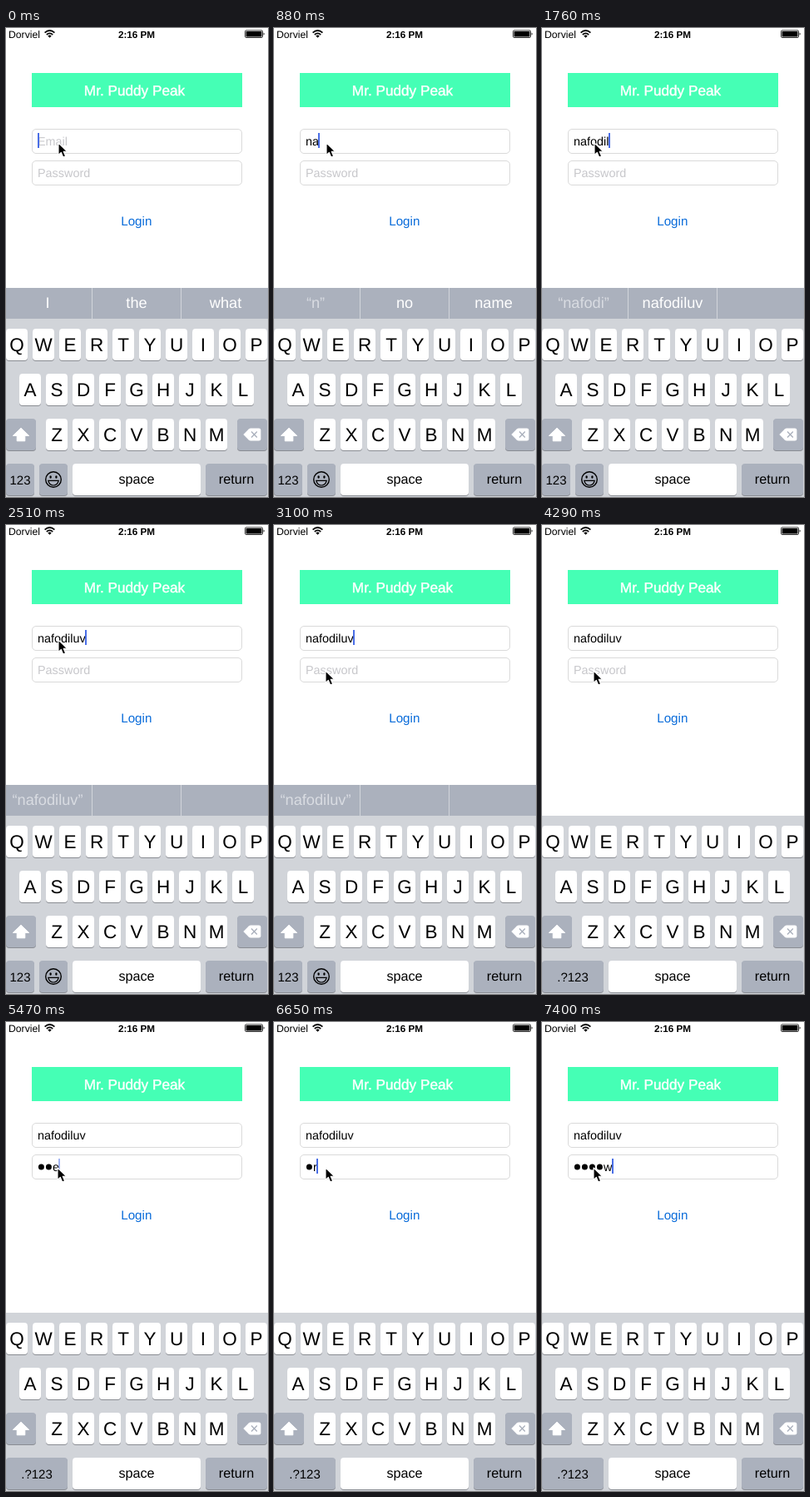
An HTML page that plays this animation: 315x563 px, repeating every 7990 ms.

```html
<!DOCTYPE html>
<html lang="en">
<head>
<meta charset="utf-8">
<title>Login form</title>
<style>
  html, body { margin: 0; width: 100%; height: 100%; overflow: hidden; background: #fff; }
  svg { display: block; width: 315px; height: 563px; }
  text {
    font-family: "Liberation Sans", Arial, sans-serif;
    text-rendering: geometricPrecision;
    white-space: pre;
  }
  .mid { text-anchor: middle; }
  .input { font-size: 14.4px; }
  .hint { fill: #c7c7cb; }
  .box { fill: #fff; stroke: #dadada; }
  .letter { font-size: 22.5px; }
  .word { font-size: 16.2px; }
  .num { font-size: 15px; }
  .slot { font-size: 18.2px; fill: #fff; }
</style>
</head>
<body>
<svg id="stage" viewBox="0 0 315 563">
  <defs>
    <clipPath id="barClip"><rect y="312" width="315" height="37"/></clipPath>
  </defs>
  <rect width="315" height="563" fill="#fff"/>

  <text x="3" y="11.6" font-size="12.2">Dorviel</text>
  <g fill="none" stroke="#000" stroke-width="1.7">
    <path d="M46.6 5.6Q52.5 .4 58.4 5.6"/>
    <path d="M48.8 8Q52.5 4.8 56.2 8"/>
  </g>
  <path d="M50.3 9.4Q52.5 7.6 54.7 9.4L52.5 11.8Z"/>
  <text class="mid" x="157" y="11.6" font-size="11.7" font-weight="bold">2:16 PM</text>
  <rect x="287.5" y="2.9" width="21" height="8.6" rx="1.3" fill="none" stroke="#000" stroke-width=".8"/>
  <rect x="288.6" y="4" width="18.8" height="6.4" rx=".5"/>
  <path d="M309.6 5.6Q311.6 7.2 309.6 8.8Z"/>

  <rect x="31" y="54" width="253" height="41" fill="#45ffb5"/>
  <text class="mid" x="154.5" y="81" font-size="17.2" fill="#fff" stroke="#fff" stroke-width=".4">Mr. Puddy Peak</text>

  <rect class="box" x="31.5" y="121.5" width="252" height="29" rx="4.5"/>
  <rect class="box" x="31.5" y="159.5" width="252" height="29" rx="4.5"/>
  <text id="emailHint" class="input hint" x="38" y="141">Email</text>
  <text id="passHint" class="input hint" x="38" y="179">Password</text>
  <text id="email" class="input" x="38" y="141"></text>
  <g id="dots"></g>
  <text id="last" class="input" y="179"></text>
  <rect id="caret" width="2" height="18" fill="#4a6ee6"/>
  <text class="mid" x="156.8" y="236.6" font-size="15.2" fill="#0a6cda">Login</text>

  <g clip-path="url(#barClip)">
    <g id="bar">
      <rect y="312" width="315" height="38" fill="#abb1bd"/>
      <path d="M103.5 312V350M210.5 312V350" stroke="#d1d5db"/>
      <g id="slots"></g>
    </g>
  </g>
  <rect y="349" width="315" height="214" fill="#d1d4d9"/>
  <g id="keys"></g>
  <path d="M18 480.2L27.6 489.4H22.8V495.8H13.2V489.4H8.4Z" fill="#fff" stroke="#fff" stroke-linejoin="round"/>
  <path d="M285.4 488L292 481.2Q293 480.4 294.2 480.4H304Q306.4 480.4 306.4 482.8V493.2Q306.4 495.6 304 495.6H294.2Q293 495.6 292 494.8Z" fill="#fff"/>
  <path d="M295 484.6L301.8 491.4M301.8 484.6L295 491.4" stroke="#abb1bd" stroke-width="1.4"/>
  <g id="plainKeys"></g>
  <g id="passKeys"></g>

  <path id="pointer" d="M0 0V14.4L3.3 11.4L5.7 17L8.6 15.8L6.2 10.3H10.6Z" fill="#000" stroke="#fff" stroke-width="1.1" stroke-linejoin="round"/>
</svg>

<script>
const LOOP = 7990;
const NAME = "nafodiluv";
const FOCUS_PASS = 3540;

// Each track: [start ms, value...]
const typed = [[0, 0], [580, 1], [880, 2], [1020, 3], [1170, 4], [1470, 5],
  [1620, 6], [1760, 7], [2060, 8], [2360, 9]];
const words = [[0, "I", "the", "what"], [730, "“n”", "no", "name"],
  [1470, "“nafo”", "nature", "national"], [1620, "“nafodi”", NAME, ""],
  [1910, "“nafodil”", NAME, ""], [2210, "“nafodilu”", NAME, ""],
  [2510, `“${NAME}”`, "", ""]];
// Hidden characters, then the one still readable
const secret = [[0, 0, ""], [4430, 0, "a"], [4730, 1, "s"], [4870, 2, "e"],
  [5620, 2, ""], [5760, 1, ""], [5900, 0, ""], [6650, 1, "r"], [6950, 2, "e"],
  [7250, 3, "o"], [7400, 4, "w"]];
const blink = [[0, 1], [140, 0], [580, 1], [2650, .5], [2800, 0], [3100, 1],
  [4140, .5], [4280, 0], [4430, 1], [5470, .5], [5620, 1]];
const moves = [[0, 63, 138], [2650, 63, 141], [2800, 63, 154], [2950, 62, 169], [3100, 62, 175]];
const slide = [[0, 0], [FOCUS_PASS, 24], [3690, 38]];

const $ = id => document.getElementById(id);
const at = (track, t) => track.findLast(step => step[0] <= t).slice(1);

function add(parent, tag, attrs, label) {
  const el = document.createElementNS("http://www.w3.org/2000/svg", tag);
  for (const k in attrs) el.setAttribute(k, attrs[k]);
  if (label) el.textContent = label;
  return parent.appendChild(el);
}

function key(parent, x, y, width, label, style, fill = "#fff") {
  const box = { x, width, height: 38, rx: 4 };
  add(parent, "rect", { ...box, y: y + 1, fill: "#898c92" });
  add(parent, "rect", { ...box, y, fill });
  const base = style === "letter" ? 27 : style === "num" ? 25 : 24;
  if (label) add(parent, "text", { x: x + width / 2, y: y + base, class: "mid " + style }, label);
}

function buildKeyboard() {
  const keys = $("keys"), plain = $("plainKeys"), grey = "#abb1bd";
  [["QWERTYUIOP", 0, 361], ["ASDFGHJKL", 16, 415], ["ZXCVBNM", 48, 469]].forEach(([row, x, y]) =>
    [...row].forEach((c, i) => key(keys, x + i * 32, y, 26, c, "letter")));
  key(keys, 0, 469, 36, "", "", grey);
  key(keys, 278, 469, 36, "", "", grey);
  key(keys, 80, 523, 154, "space", "word");
  key(keys, 240, 523, 74, "return", "word", grey);
  key(plain, 0, 523, 34, "123", "num", grey);
  key(plain, 40, 523, 34, "", "", grey);
  key($("passKeys"), 0, 523, 74, ".?123", "num", grey);
  // Smiley
  add(plain, "circle", { cx: 57, cy: 542, r: 9.3, fill: "none", stroke: "#000", "stroke-width": 1.4 });
  for (const cx of [53.6, 60.4]) add(plain, "ellipse", { cx, cy: 539, rx: 1.2, ry: 1.8 });
  add(plain, "path", { d: "M50.8 543.4H63.2Q62 549 57 549T50.8 543.4Z", fill: "none", stroke: "#000", "stroke-width": 1.2 });
}

buildKeyboard();
const slots = [50, 157, 264].map(x => add($("slots"), "text", { x, y: 335.5, class: "mid slot" }));
const dots = [0, 1, 2, 3].map(i => add($("dots"), "circle", { cx: 42.4 + i * 9, cy: 174, r: 3.5 }));

const show = (el, on) => el.setAttribute("visibility", on ? "visible" : "hidden");

function draw(t) {
  const inPass = t >= FOCUS_PASS;
  const [count] = at(typed, t);
  const [hidden, letter] = at(secret, t);
  const email = $("email"), last = $("last"), caret = $("caret");

  email.textContent = NAME.slice(0, count);
  show($("emailHint"), !count);
  show($("passHint"), !hidden && !letter);
  dots.forEach((dot, i) => show(dot, i < hidden));
  const lastX = 38 + hidden * 9;
  last.setAttribute("x", lastX);
  last.textContent = letter;

  const end = inPass
    ? lastX + (letter ? last.getComputedTextLength() : 0)
    : 38 + (count ? email.getComputedTextLength() : 0);
  caret.setAttribute("x", Math.max(38, Math.round(end - .7)));
  caret.setAttribute("y", inPass ? 164 : 126);
  caret.setAttribute("opacity", at(blink, t)[0]);

  at(words, t).forEach((word, i) => {
    slots[i].textContent = word;
    slots[i].style.fill = word.startsWith("“") ? "#d9dce2" : "#fff";
  });
  $("bar").setAttribute("transform", `translate(0 ${at(slide, t)[0]})`);
  show($("plainKeys"), !inPass);
  show($("passKeys"), inPass);
  $("pointer").setAttribute("transform", `translate(${at(moves, t)})`);
}

const start = performance.now();
function tick() {
  draw((performance.now() - start) % LOOP);
  requestAnimationFrame(tick);
}
tick();
</script>
</body>
</html>
```
